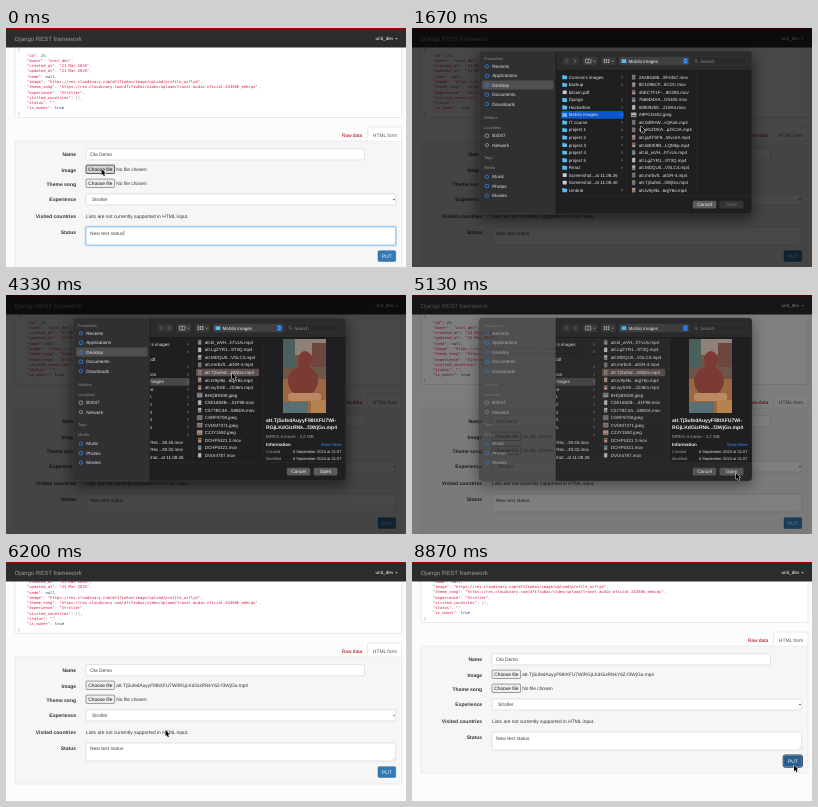
Animation of 400 by 239 pixels, one loop 9 s. Source, as an HTML page with a canvas:

```html
<!DOCTYPE html>
<html lang="en">
<head>
<meta charset="utf-8">
<title>Upload form</title>
<style>
html, body { margin: 0; width: 100%; height: 100%; overflow: hidden; background: #fcfcfc; }
canvas { display: block; width: 100vw; height: 100vh; }
</style>
</head>
<body>
<canvas></canvas>
<script>
const W = 400, H = 239, LOOP = 9000;
const SANS = '"Liberation Sans", Arial, sans-serif';
const MONO = '"DejaVu Sans Mono", monospace';
const canvas = document.querySelector('canvas');
const ctx = canvas.getContext('2d');

const clamp = v => Math.max(0, Math.min(1, v));
const ease = v => v * v * (3 - 2 * v);
const span = (t, a, b) => clamp((t - a) / (b - a));

// Value along keys [time, ...values], eased unless told otherwise.
function along(keys, t, curve = ease) {
  let i = 0;
  while (i < keys.length - 2 && t >= keys[i + 1][0]) i++;
  const [a, b] = [keys[i], keys[i + 1]];
  const k = curve(span(t, a[0], b[0]));
  return a.slice(1).map((v, n) => v + (b[n + 1] - v) * k);
}

const POINTER = [
  [0, 95.5, 141], [1200, 95.5, 141], [1640, 229, 98], [2130, 229, 98],
  [2900, 237, 133], [3070, 237, 133], [3870, 226, 78], [4530, 226, 78],
  [5000, 324, 178], [5470, 324, 178], [6200, 159.5, 168], [6400, 156, 164],
  [7200, 109, 118], [7330, 109, 118], [8000, 330, 190], [8200, 330, 190],
  [8700, 382, 203], [9000, 382, 203]
];
const PAGE_SCROLL = [[5900, 0], [6200, 18], [6330, 24], [6500, 29]];
const LIST_SCROLL = [[1720, 0], [2070, 4], [2130, 4], [2900, 10], [3070, 10], [3400, 10.25]];

const USER = 'unit_dev';
const FILE = 'att.TjSufedAuyyF98tXFU7WiRGjLKdGizRNkY6Z-f3WjGo.mp4';
const CLOUD = 'https://res.cloudinary.com/dfi7iw6ox/';
const JSON_ROWS = [
  ['id', 25], ['owner', USER], ['created_at', '21 Mar 2025'], ['updated_at', '21 Mar 2025'],
  ['name', null], ['image', CLOUD + 'image/upload/profile_ozflyd'],
  ['theme_song', CLOUD + 'video/upload/travel-audio-oficial-243586_eehcqv'],
  ['experience', 'Stroller'], ['visited_countries', []], ['status', ''], ['is_owner', true]
];
const FOLDERS = ["Corinna's images", 'backup', 'bitcoin.pdf', 'Django', 'Hackathon', 'Mobilo images',
  'IT course', 'project 1', 'project 2', 'project 3', 'project 4', 'project 5', 'React'];
const EARLY = ['Screenshot...at 11.08.26', 'Screenshot...at 11.08.40', 'Umbral'];
const LATE = ['Screen Rec...38.45.mov', 'Screen Rec...39.32.mov', 'Screenshot...at 11.08.26'];
const MEDIA = ['2A484486...9F4467.mov', '8D1096CF...5CDC.mov', '45EC7F1F-...8D280.mov',
  '7666D4AA...D5305.mov', '0890920E...219A4.mov', 'A9PGG402.jpeg', 'att.0dRHW...vQKak.mp4',
  'att.dGZDKA...pZiC2A.mp4', 'att.jqATSF8...WvxnX.mp4', 'att.kB0K9B...LQMkp.mp4',
  'att.kl_wVH...hTvUs.mp4', 'att.LgZYR1...9T3Q.mp4', 'att.MDQU0...VSLC4.mp4',
  'att.mrrbvft...atGR-4.mp4', 'att.TjSufed...3WjGo.mp4', 'att.tv9y9ki...6qjY6o.mp4',
  'att.wySXE...JZ36m.mp4', 'BHQB9308.jpeg', 'C5E1682B-...01F98.mov', 'C577BC4A...588DA.mov',
  'CSRF9708.jpeg', 'CVDM7371.jpeg', 'CZJY1592.jpeg', 'DCHP5321 2.mov', 'DCHP5321.mov', 'DVUI4787.mov'];
const THUMBS = ['#8d6a55', '#a9b2b8', '#5f7486', '#b38f76', '#746b66', '#c5bcae', '#8a5048'];
const PICKED = 14, ROW = 7.53;
const DIALOG = [67, 23, 273, 163];

function text(s, x, y, size, color, { bold, align = 'left', font = SANS } = {}) {
  ctx.font = `${bold ? 'bold ' : ''}${size}px ${font}`;
  ctx.textAlign = align;
  ctx.fillStyle = color;
  ctx.fillText(s, x, y + size * 0.35);
}

function box(x, y, w, h, fill, stroke, r = 0, line = 0.5) {
  ctx.beginPath();
  ctx.roundRect(x, y, w, h, r);
  if (fill) { ctx.fillStyle = fill; ctx.fill(); }
  if (stroke) { ctx.strokeStyle = stroke; ctx.lineWidth = line; ctx.stroke(); }
}

function path(points, color, width = 0.7) {
  ctx.beginPath();
  points.forEach(([x, y]) => ctx.lineTo(x, y));
  ctx.strokeStyle = color;
  ctx.lineWidth = width;
  ctx.stroke();
}

const chevron = (x, y, dir, r, color) =>
  path([[x - dir * r / 2, y - r], [x + dir * r / 2, y], [x - dir * r / 2, y + r]], color);

function triangle(x, y, r, color) {
  ctx.beginPath();
  ctx.moveTo(x - r, y - r / 2);
  ctx.lineTo(x + r, y - r / 2);
  ctx.lineTo(x, y + r / 2);
  ctx.fillStyle = color;
  ctx.fill();
}

function clipped(x, y, w, h, draw) {
  ctx.save();
  ctx.beginPath();
  ctx.rect(x, y, w, h);
  ctx.clip();
  draw();
  ctx.restore();
}

function faded(alpha, draw) {
  if (alpha <= 0) return;
  ctx.save();
  ctx.globalAlpha = alpha;
  draw();
  ctx.restore();
}

function drawJson() {
  const size = 3.84, step = 2.312, pitch = 5.27;
  const put = (s, x, y, color) => {
    text(s, x, y, size, color, { font: MONO });
    return x + s.length * step;
  };
  const grey = '#7d8a8a', red = '#d9143f';
  put('{', 11.8, 22, grey);
  JSON_ROWS.forEach(([key, value], i) => {
    const y = 22 + pitch * (i + 1);
    let x = put(`"${key}"`, 21, y, red);
    x = put(': ', x, y, grey);
    const color = typeof value === 'string' ? red
      : typeof value === 'number' ? '#195f91' : Array.isArray(value) ? grey : '#1e347b';
    x = put(JSON.stringify(value), x, y, color);
    if (i < JSON_ROWS.length - 1) put(',', x, y, grey);
  });
  put('}', 11.8, 22 + pitch * 12, grey);
}

function fileField(y, label, value, pressed) {
  text(label, 70, y + 0.8, 5, '#333', { bold: true, align: 'right' });
  box(80, y - 4.4, 28.6, 8.4, pressed ? '#d4d4d4' : '#efefef', pressed ? '#222' : '#767676', 1, 0.7);
  text('Choose file', 94.3, y - 0.2, 4.8, '#111', { align: 'center' });
  text(value, 110.3, y - 0.2, 4.8, '#333');
}

function drawForm(t) {
  const label = (s, y) => text(s, 70, y, 5, '#333', { bold: true, align: 'right' });
  text('Raw data', 346, 107, 4.9, '#a30000', { align: 'center' });
  box(9, 113, 387, 127, '#f6f6f6', '#dcdcdc', 1);
  box(361.7, 99, 34.3, 14.3, '#fff', '#d5d5d5', 1);
  box(362, 112.6, 33.7, 1, '#fafafa');
  text('HTML form', 379, 107, 4.9, '#555', { align: 'center' });

  label('Name', 126);
  box(80, 120.7, 278.5, 11.2, '#fff', '#c8c8c8', 1);
  text('Ola Demo', 84, 126.2, 4.9, '#444');
  fileField(141.5, 'Image', t < 5200 ? 'No file chosen' : FILE, t < 400);
  fileField(155.5, 'Theme song', 'No file chosen', false);
  label('Experience', 171.7);
  box(80, 166, 309.7, 11, '#fff', '#c8c8c8', 1);
  text('Stroller', 86, 171.7, 4.9, '#444');
  triangle(388, 171.6, 1.1, '#333');
  label('Visited countries', 188);
  text('Lists are not currently supported in HTML input.', 80, 188, 4.88, '#333');
  label('Status', 204.3);
  const focused = t < 400;
  if (focused) box(79.6, 198.6, 310.5, 18.8, null, 'rgba(102,175,233,.4)', 1.4, 1.6);
  box(80, 199, 309.7, 18, '#fff', focused ? '#5b9bd0' : '#c8c8c8', 1);
  text('New test status', 84, 204.8, 4.9, '#444');
  if (focused) path([[118, 202.4], [118, 207.4]], '#222', 0.4);
  path([[387, 216], [389, 214]], '#999', 0.4);

  const hot = t >= 8600;
  if (hot) box(371.2, 222, 19.2, 12.2, null, '#10243a', 1.8, 0.9);
  box(372, 222.7, 17.7, 10.8, hot ? '#286090' : '#337ab7', '#2a6496', 1.2);
  text('PUT', 380.9, 228.2, 4.9, '#fff', { align: 'center' });
}

function drawPage(t) {
  box(0, 0, W, H, '#fcfcfc');
  ctx.save();
  ctx.translate(0, -along(PAGE_SCROLL, t, v => v)[0]);
  box(9, -20, 387, 109.5, '#fff', '#d2d2d2', 1);
  drawJson();
  drawForm(t);
  ctx.restore();
  box(0, 0, W, 19.5, '#2c2c2c');
  box(0, 0, W, 1.5, '#a30000');
  text('Django REST framework', 9, 10.5, 6.05, '#9d9d9d');
  text(USER, 369.5, 10.5, 4.7, '#fff');
  triangle(390.5, 10.8, 1.3, '#ddd');
}

function drawSidebar() {
  box(67, 23, 77, 163, '#303032', null, [4, 0, 0, 4]);
  box(70, 52.4, 71.5, 9.2, '#505053', null, 1.5);
  [['Favourites', 30.5], ['Nimbus', 90], ['Locations', 100], ['Tags', 130], ['Media', 139.5]]
    .forEach(([s, y]) => text(s, 72, y, 4, '#8c8c8f'));
  const groups = [[38.3, ['Recents', 'Applications', 'Desktop', 'Documents', 'Downloads']],
    [107.7, ['B3047', 'Network']], [148.7, ['Music', 'Photos', 'Movies']]];
  groups.forEach(([top, names], g) => names.forEach((s, i) => {
    const y = top + i * 9.45;
    box(73.2, y - 1.6, 3.4, 3.2, null, g === 1 ? '#a0a0a4' : '#2f86e8', (i + g) % 2 ? 0.6 : 1.6, 0.8);
    text(s, 80.3, y, 4.6, '#e2e2e4');
  }));
}

function drawFolders(t) {
  FOLDERS.concat(t < 2130 ? EARLY : LATE).forEach((s, i) => {
    const y = 49.2 + i * ROW, file = s === 'bitcoin.pdf' || s.startsWith('Screen');
    if (i === 5) box(149, y - 3.8, 62.5, 7.6, t < 4130 ? '#0a57d0' : '#48484b', null, 1.2);
    if (file) box(150.7, y - 1.8, 4, 3.6, '#c9cdd2', null, 0.4);
    else {
      box(150.3, y - 2.1, 2.4, 1.6, '#3d9bd0', null, 0.4);
      box(150.3, y - 1.5, 4.8, 3.6, '#5bbcec', null, 0.5);
      chevron(210, y, 1, 1.1, '#98989c');
    }
    text(s, 156.8, y, 4.5, '#e4e4e6');
  });
}

function drawMedia(t) {
  const top = 49.2 - along(LIST_SCROLL, t)[0] * ROW;
  MEDIA.forEach((s, i) => {
    const y = top + i * ROW;
    if (i === PICKED && t >= 4130) box(218, y - 3.8, 63, 7.6, '#5d504e', null, 1.2);
    const wide = s.endsWith('jpeg');
    box(wide ? 219.2 : 220.3, y - 2.1, wide ? 5 : 2.8, 4.2, THUMBS[i * 3 % 7], '#ddd', 0.2, 0.25);
    box(wide ? 219.7 : 220.6, y + 0.2, wide ? 4 : 2.2, 1.4, THUMBS[(i * 5 + 2) % 7]);
    text(s, 226.8, y, 4.5, '#e4e4e6');
  });
}

function drawPhoto() {
  clipped(277, 44, 43, 74, () => {
    box(277, 44, 43, 74, '#6e5548');
    box(277, 44, 43, 16, '#8d8178');
    box(277, 44, 12, 29, '#4b5f5d');
    box(306, 48, 14, 24, '#6d473d');
    box(277, 84, 43, 34, '#9a6742');
    ctx.fillStyle = '#7c3a35';
    ctx.beginPath();
    ctx.ellipse(299, 65, 7, 9, 0, 0, 7);
    ctx.ellipse(297, 86, 15, 15, -0.3, 0, 7);
    ctx.fill();
    box(282, 98, 33, 8, '#b98a62', null, 3);
    box(277, 107, 25, 11, '#587073');
    box(305, 105, 15, 13, '#b5834f');
  });
}

function drawPreview() {
  box(258, 43, 82, 124, '#1f1f21');
  drawPhoto();
  text('att.TjSufedAuyyF98tXFU7Wi-', 260, 125.2, 5.1, '#eee', { bold: true });
  text('RGjLKdGizRNk...f3WjGo.mp4', 260, 132.7, 5.1, '#eee', { bold: true });
  text('MPEG-4 movie - 2,2 MB', 260, 141, 4.4, '#a2a2a5');
  text('Information', 260, 149.7, 4.5, '#eee', { bold: true });
  text('Show More', 335.5, 149.7, 4.1, '#3b8df0', { align: 'right' });
  [['Created', 156.3], ['Modified', 163.2]].forEach(([s, y]) => {
    text(s, 260, y, 4, '#9a9a9d');
    text('6 September 2024 at 21:07', 335.5, y, 4, '#ddd', { align: 'right' });
  });
}

function drawToolbar() {
  box(144, 23, 196, 19.5, '#2b2b2d', null, [0, 4, 0, 0]);
  [[151, -1], [159.5, 1]].forEach(([x, dir]) => {
    box(x, 29, 7.5, 8, '#363638', null, 1.4);
    chevron(x + 3.7, 33, dir, 1.7, '#7a7a7d');
  });
  box(171, 28.8, 14, 8.4, '#39393b', null, 1.6);
  box(173.5, 31.2, 5.5, 3.8, null, '#d5d5d8', 0.5, 0.6);
  path([[176.2, 31.2], [176.2, 35]], '#d5d5d8', 0.5);
  path([[181.3, 32.6], [182.4, 33.8], [183.5, 32.6]], '#b5b5b8', 0.6);
  box(189.5, 28.8, 14, 8.4, '#39393b', null, 1.6);
  for (let i = 0; i < 6; i++) box(191.7 + i % 3 * 2.1, i < 3 ? 31.2 : 33.5, 1.4, 1.4, '#c5c5c8');
  path([[199.6, 32.6], [200.7, 33.8], [201.8, 32.6]], '#b5b5b8', 0.6);
  box(207, 28.8, 70.5, 8.4, '#404043', null, 1.6);
  box(209.5, 31.2, 4.8, 3.8, '#5bbcec', null, 0.5);
  text('Mobilo images', 216.5, 33.2, 4.6, '#eee');
  box(271, 30, 5, 6, '#1768d8', null, 1.2);
  path([[272.5, 32.4], [273.5, 31.3], [274.5, 32.4]], '#fff', 0.5);
  path([[272.5, 33.7], [273.5, 34.8], [274.5, 33.7]], '#fff', 0.5);
  box(280, 28.8, 55, 8.4, '#29292b', '#434346', 1.6, 0.4);
  ctx.beginPath();
  ctx.arc(284, 32.7, 1.4, 0, 7);
  ctx.strokeStyle = '#98989b';
  ctx.stroke();
  path([[285, 33.7], [286.2, 34.9]], '#98989b', 0.5);
  text('Search', 288.3, 33.2, 4.6, '#8d8d90');
}

function drawBrowser(t) {
  box(144, 23, 196, 163, '#1f1f21', null, [0, 4, 4, 0]);
  const open = ease(span(t, 4130, 4330)), shift = -28 * open;
  clipped(144, 43, 196, 124, () => {
    ctx.translate(shift, 0);
    drawFolders(t);
    clipped(215, 43, 70, 124, () => drawMedia(t));
    [215, 285].forEach(x => path([[x, 43], [x, 167]], '#2d2d30', 0.5));
    const bar = along(LIST_SCROLL, t)[0];
    if (t > 1720 && t < 3600) box(281.3, 45 + bar * 0.1, 1.8, 8, '#8a8a8d', null, 0.9);
  });
  if (open > 0) faded(open, () => clipped(144, 43, 196, 124, drawPreview));
  drawToolbar();
  path([[144, 42.6], [340, 42.6]], '#111', 0.5);
  path([[144, 167.4], [340, 167.4]], '#303033', 0.5);
  box(280.8, 172.8, 23.5, 7.8, '#5b5b5e', null, 1.6);
  text('Cancel', 292.5, 176.8, 4.7, '#f2f2f2', { align: 'center' });
  const ready = t >= 4130;
  box(307.5, 172.8, 24, 7.8, ready ? '#5b5b5e' : '#343436', null, 1.6);
  text('Open', 319.5, 176.8, 4.7, ready ? '#f2f2f2' : '#707073', { align: 'center' });
}

// Soft shadow around the dialog, kept out of its inside.
function drawShadow() {
  const scale = ctx.getTransform().a;
  ctx.beginPath();
  ctx.rect(0, 0, W, H);
  ctx.roundRect(...DIALOG, 4);
  ctx.clip('evenodd');
  ctx.shadowColor = 'rgba(0,0,0,.6)';
  ctx.shadowBlur = 14 * scale;
  ctx.shadowOffsetY = 4 * scale;
  box(...DIALOG, '#000', null, 4);
}

function drawDialog(t) {
  const away = t < 2000 ? 1 - span(t, 270, 500) : span(t, 5070, 5270);
  if (away >= 1) return;
  faded(0.72 * (1 - away), () => box(0, 0, W, H, '#000'));
  faded(1 - away, drawShadow);
  faded(1 - away * 1.3, drawSidebar);
  faded(1 - away * away, () => drawBrowser(t));
  faded(1 - away, () => {
    box(...DIALOG, null, '#4c4c4f', 4, 0.4);
    path([[144, 23], [144, 186]], '#111', 0.5);
  });
}

function drawPointer(t) {
  const [x, y] = along(POINTER, t);
  ctx.beginPath();
  [[0, 0], [0, 6.2], [1.4, 5], [2.4, 7.2], [3.4, 6.8], [2.5, 4.6], [4.3, 4.5]]
    .forEach(([dx, dy]) => ctx.lineTo(x + dx, y + dy));
  ctx.closePath();
  ctx.lineJoin = 'round';
  ctx.lineWidth = 0.9;
  ctx.strokeStyle = '#fff';
  ctx.stroke();
  ctx.fillStyle = '#000';
  ctx.fill();
}

function resize() {
  const ratio = window.devicePixelRatio || 1;
  canvas.width = Math.round(innerWidth * ratio);
  canvas.height = Math.round(innerHeight * ratio);
}

const start = performance.now();
function tick(now) {
  const t = Math.max(0, now - start) % LOOP;
  ctx.setTransform(canvas.width / W, 0, 0, canvas.height / H, 0, 0);
  ctx.textRendering = 'geometricPrecision';
  drawPage(t);
  drawDialog(t);
  drawPointer(t);
  requestAnimationFrame(tick);
}

addEventListener('resize', resize);
resize();
tick(start);
</script>
</body>
</html>
```
